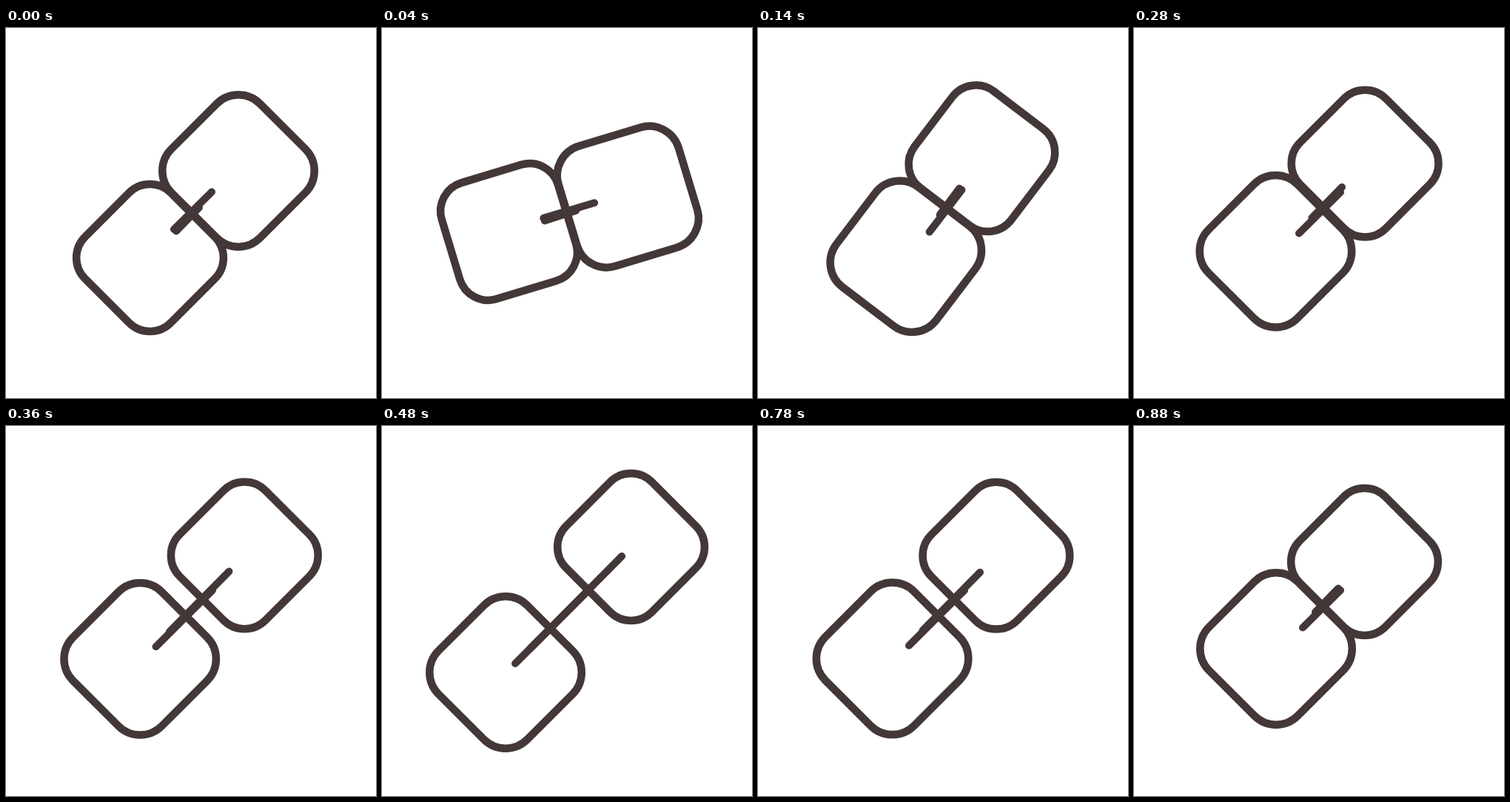
Write an HTML page that moves like this. It is 500 px wide and 500 px high and loops after 0.9 s.

```html
<!DOCTYPE html>
<html lang="en">
<head>
<meta charset="utf-8">
<title>Link</title>
<style>
  html, body { margin: 0; width: 100%; height: 100%; overflow: hidden; background: #fff; }
  svg { display: block; width: 100vw; height: 100vh; }
  .link { fill: none; stroke: #433737; stroke-width: 10.5; stroke-linecap: round; }
  .bar { stroke-width: 10; }
</style>
</head>
<body>
<svg viewBox="0 0 500 500">
  <g class="link" id="link">
    <rect id="big" x="-84.8" y="-84.8" width="169.6" height="169.6" rx="41.5"/>
    <rect id="small" x="-82" y="-82" width="164" height="164" rx="40"/>
    <path id="barA" class="bar"/>
    <path id="barB" class="bar"/>
  </g>
</svg>
<script>
  const LOOP = 900, STEP = 20;
  const [link, big, small, barA, barB] =
    ['link', 'big', 'small', 'barA', 'barB'].map(id => document.getElementById(id));

  // Smooth ease in and out between two times
  function ease(t, from, to) {
    const s = Math.min(1, Math.max(0, (t - from) / (to - from)));
    return s * s * (3 - 2 * s);
  }

  const mix = (a, b, p) => a.map((v, i) => v + (b[i] - v) * p);
  const place = (el, pos) => el.setAttribute('transform', `translate(${pos}) rotate(45)`);
  const line = (el, a, b) => el.setAttribute('d', `M${a}L${b}`);

  function draw(t) {
    const turn = 180 + 180 * ease(t, 0, 160);
    const apart = ease(t, 260, 480) - ease(t, 680, 860);
    const grow = ease(t, 230, 480) - ease(t, 680, 880);

    link.setAttribute('transform', `rotate(${turn} 253 247)`);
    place(big, mix([192, 301], [167, 333], apart));
    place(small, mix([311.5, 183.5], [336.5, 163.5], apart));
    line(barA, [279, 222], mix([228, 272.5], [180, 321], grow));
    line(barB, mix([245, 251.5], [200, 301], grow), mix([276, 219.5], [324, 176], grow));
  }

  function tick() {
    draw(Math.floor(performance.now() % LOOP / STEP) * STEP);
    requestAnimationFrame(tick);
  }
  tick();
</script>
</body>
</html>
```
